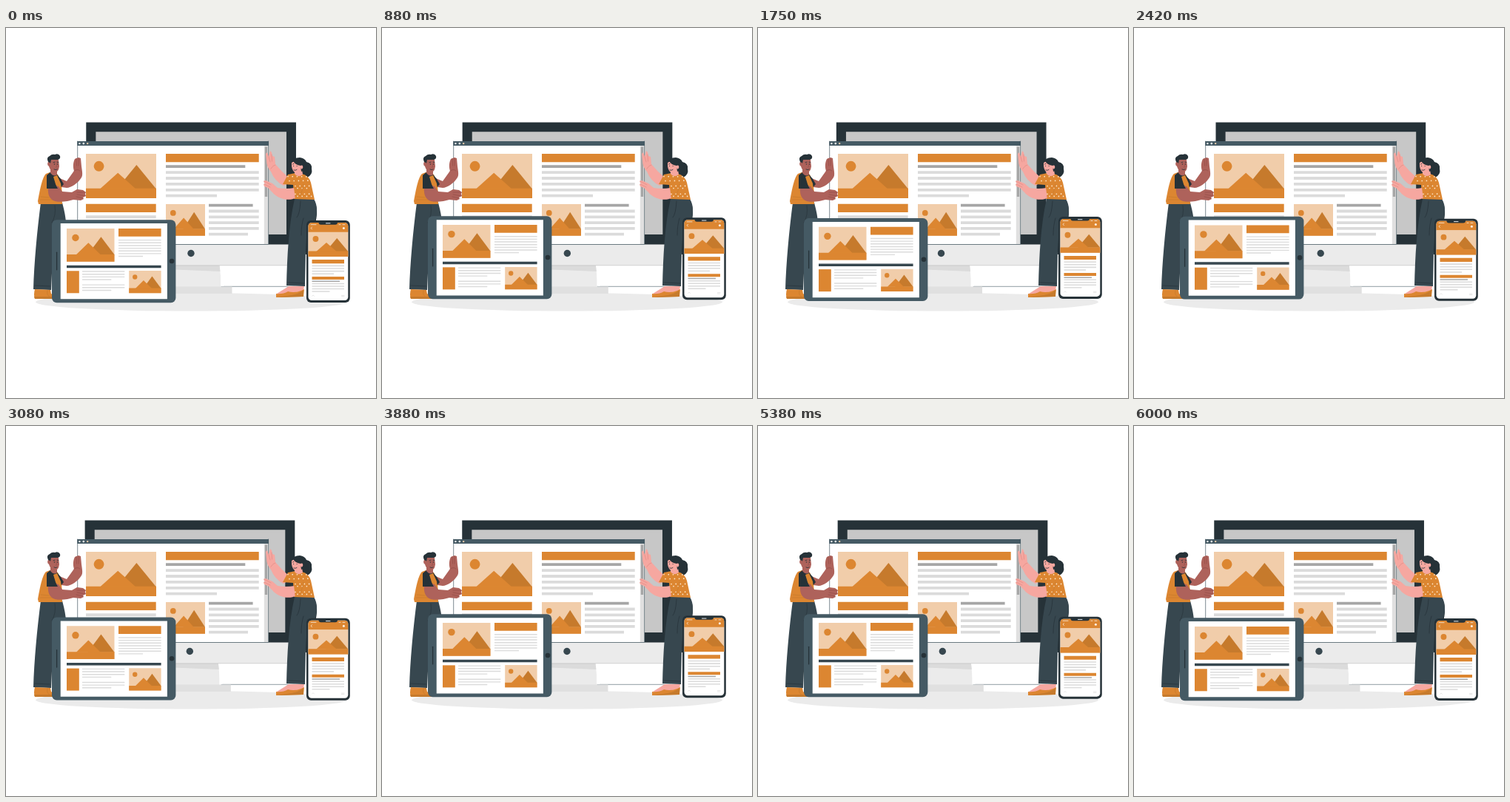
Animation, 500 px wide and 500 px high, one loop 6040 ms. Source, as an HTML page with a canvas:

```html
<!DOCTYPE html>
<html lang="en">
<head>
<meta charset="utf-8">
<title>Responsive layouts</title>
<style>
html, body { margin: 0; width: 100%; height: 100%; overflow: hidden; background: #fff; }
canvas { display: block; width: 500px; height: 500px; }
</style>
</head>
<body>
<canvas id="stage"></canvas>
<script>
const canvas = document.getElementById('stage');
const ctx = canvas.getContext('2d');
const dpr = window.devicePixelRatio || 1;
canvas.width = canvas.height = 500 * dpr;

const LOOP = 6040, LEAD = 25, REACH = 6.5;
const ORANGE = '#dc8631', BROWN = '#c67a2c', PEACH = '#f1cdaa';
const INK = '#263238', SLATE = '#455a64', PANTS = '#37474f';
const PALE = '#ebebeb', GREY = '#dbdbdb', MID = '#a6a6a6';
const SKIN = '#ae625b', SKIN_DARK = '#8d4844', PINK = '#f6a7a0';

function box(color, x1, y1, x2, y2, r = 0) {
  ctx.fillStyle = color;
  ctx.beginPath();
  ctx.roundRect(x1, y1, x2 - x1, y2 - y1, r);
  ctx.fill();
}
function disc(color, x, y, r, ry = r) {
  ctx.fillStyle = color;
  ctx.beginPath();
  ctx.ellipse(x, y, r, ry, 0, 0, Math.PI * 2);
  ctx.fill();
}
function shape(color, d) {
  ctx.fillStyle = color;
  ctx.fill(new Path2D(d));
}
function stroke(color, width, d) {
  ctx.strokeStyle = color;
  ctx.lineWidth = width;
  ctx.lineCap = ctx.lineJoin = 'round';
  ctx.stroke(new Path2D(d));
}
// Evenly spaced text lines; the last one is shorter.
function lines(x1, x2, last, y, step, count, h, color = GREY) {
  for (let i = 0; i < count; i++) {
    box(color, x1, y + i * step, i === count - 1 ? last : x2, y + i * step + h);
  }
}
function picture(x1, y1, x2, y2) {
  const w = x2 - x1, h = y2 - y1;
  const px = k => x1 + k * w, py = k => y1 + k * h;
  const peak = (color, l, m, r, top) =>
    shape(color, `M${px(l)} ${py(.79)}L${px(m)} ${py(top)}L${px(r)} ${py(.79)}Z`);
  box(PEACH, x1, y1, x2, y2);
  disc(ORANGE, px(.185), py(.28), w * .073);
  peak(BROWN, .44, .72, 1, .25);
  peak(ORANGE, .2, .455, .71, .43);
  box(ORANGE, x1, py(.78), x2, y2);
}
function moved(dx, dy, draw) {
  ctx.save();
  ctx.translate(dx, dy);
  draw();
  ctx.restore();
}

function monitor() {
  box(PALE, 210, 321, 290, 350);
  shape('#fff', 'M288.5 321H294V349H291.5Z');
  shape(GREY, 'M210 320H288.5L289.5 329L229 326.5H210Z');
  box('#e0e0e0', 195, 349.5, 305.5, 359);
  box(INK, 108.3, 127.6, 392, 293);
  box('#c7c7c7', 121.4, 140.2, 379, 279);
  box(PALE, 108.3, 292.5, 392, 321, [0, 0, 5, 5]);
  stroke(MID, .4, 'M110 320.8H389');
  disc(PANTS, 250, 304.5, 4.7);
}

function browser() {
  box('#fff', 96.5, 153, 354.8, 292.6);
  box('#e0e0e0', 348.8, 159, 354.4, 292);
  box(MID, 349.8, 160.5, 353.2, 228);
  stroke(SLATE, .7, 'M96.7 153V292.5H354.6V153');
  box(SLATE, 96.3, 153, 355, 159);
  disc('#fff', 99.4, 156.1, 1.2);
  disc('#fff', 104.8, 156.1, 1.3);
  disc(PEACH, 110.2, 156.1, 1.2);
  picture(108, 170, 203, 230);
  box(ORANGE, 108, 237.7, 202.7, 249);
  box(GREY, 108, 253.2, 202.7, 257.2);
  box(ORANGE, 216, 170, 341.7, 181.3);
  box(MID, 216, 185.2, 323.3, 189);
  lines(216, 341.7, 285, 193.2, 7.9, 5, 3.8);
  picture(216, 238, 269, 280.8);
  box(MID, 274, 237.8, 333.6, 241.5);
  lines(274, 341.7, 327, 245.6, 7.8, 5, 3.8);
}

function man() {
  // Raised far arm
  shape(SKIN, 'M70 202L82 207L92 193C90 187 91 181 93 177L95 176L98 175L101 176L102 187C103 194 104 199 102 202C98 209 88 216 82 216L68 214Z');
  stroke(SKIN_DARK, .6, 'M95 177L95.5 186M98 176.5L98 186M92 193Q97 190 100 193');
  shape(PANTS, 'M47 236H76C78 244 80 251 81 262L64 286L61 354L37 353C38 318 42 274 47 236Z');
  stroke(INK, .6, 'M66 240Q68 253 62 263M39 348L60 349');
  shape(ORANGE, 'M39 353L60 354L61 359L68 364V366H39Q37 360 39 353Z');
  shape(BROWN, 'M38 363H66V366H39Z');
  stroke(BROWN, .7, 'M56 355Q54 361 60 364');
  shape(ORANGE, 'M54 197C50 201 47 211 43 234L44 238H76L75 209L70 198L62 194Z');
  stroke(BROWN, .7, 'M46 232H74M47 228L58 229');
  shape(INK, 'M55 199L61 194L69 198L74 204L78 211L72 218L55 217Z');
  shape(ORANGE, 'M64 201L69 199L74 210L76 225L70 221Z');
  shape(SKIN, 'M60 190L69 190L69 198Q65 202 60 196Z');
  shape(SKIN, 'M58 178Q64 174 71 178L72 187Q71 195 66 195Q60 194 58 187Q55 183 58 178Z');
  shape(INK, 'M57 181Q54 175 59 173Q62 170 66 171Q71 169 73 173Q74 177 70 178L61 178L60 183Z');
  disc(SKIN, 58, 184, 1.8, 2.4);
  stroke(INK, .8, 'M64 181.8L66 181.2M69 181.2L70.7 181.5M65 191Q67 192.3 69 191');
  disc(INK, 65.4, 184, .65);
  disc(INK, 69.6, 184, .65);
  stroke(SKIN_DARK, .5, 'M67.7 183L69 188H67');
  // Near arm reaching across
  shape(SKIN, 'M57 215C56 225 59 232 66 234C75 236 84 234 91 232L101 233L105 231L104 229L108 227L107 224L108 222L104 219L96 218L89 222L76 221L71 214Q62 210 57 215Z');
  stroke(SKIN_DARK, .6, 'M96 222L107 222M96 225L107 227M95 228L104 230');
  shape(INK, 'M55 201Q64 205 70 217L57 217Z');
}

function woman() {
  // Raised far arm
  shape(PINK, 'M380 210L375 213Q363 207 358 194Q352 188 352 179L351 170L353 168L355 174L357 166L359 168L360 173L363 174L364 184Q373 195 383 203Z');
  stroke('#d77f79', .5, 'M355 174L357 181M359 171L359.5 180M358 190Q361 185 364 185');
  shape(INK, 'M386 182Q388 175 397 175Q404 176 406 181Q414 183 413 190Q415 198 407 202Q400 202 397 198L388 188Z');
  // Legs
  shape(INK, 'M398 236L417 234C421 243 421 252 418 264L413 306H405L397 275Z');
  shape(PANTS, 'M390 231H416C422 240 421 256 415 265L407 269L405 300L404 349L379 348C380 309 382 265 390 231Z');
  stroke(INK, .7, 'M398 234Q397 252 393 256M402 257Q399 266 399 280M381 344L403 345');
  shape(PINK, 'M382 349H403L402 355L371 361L366 359Z');
  shape(ORANGE, 'M365 359Q374 360 381 356Q392 359 403 353L402 363L365 364Z');
  shape(BROWN, 'M386 361Q397 359 402 354V363L365 364Z');
  // Blouse
  shape(ORANGE, 'M381 198L391 196L400 197Q409 199 412 209L417 232L389 231L388 212L374 211Z');
  shape(PINK, 'M390 191H400L401 198Q394 203 390 197Z');
  shape(PINK, 'M386 182Q391 178 399 181L400 190Q398 196 392 196Q387 194 386 187Z');
  shape(INK, 'M386 182Q390 175 398 177Q404 180 402 193L399 194L398 186Q391 185 388 180Z');
  disc(PINK, 399.5, 188, 1.8, 2.4);
  stroke(INK, .8, 'M387.5 184L389 183.5M392 183.5L394.5 184M389 192Q391 193 393 191.5');
  disc(INK, 388.6, 186.5, .6);
  disc(INK, 393.1, 186.5, .6);
  // Near arm
  shape(PINK, 'M390 216L392 229C383 235 367 231 360 222L354 216L349 214L348 211L350 211L348 207L351 206L360 210L367 216Q378 218 390 216Z');
  stroke('#d77f79', .5, 'M349 207L358 212M349 211L357 215M391 218Q393 224 390 229');
  shape(ORANGE, 'M388 208L402 208L400 230L391 231Z');
  ctx.fillStyle = '#fff';
  for (let row = 0; row < 6; row++) {
    const y = 201.5 + row * 5.4;
    const left = row < 2 ? 381 - row : 391;
    const right = 408 + row * 1.4;
    for (let x = left + row % 2 * 3; x < right; x += 6.2) disc('#ffe9ce', x, y + Math.sin(x) * 1.2, .85);
  }
  stroke(BROWN, .6, 'M389 211Q386 207 383 209M402 211Q401 220 397 227');
}

function tablet() {
  box(SLATE, 62, 259.5, 229.4, 371.4, 6.5);
  box('#fff', 73.7, 264.3, 217.9, 366.6);
  disc(INK, 224, 315.2, 3.3);
  stroke(INK, 1.3, 'M68.6 303.5V327');
  picture(82, 271.2, 146.5, 316);
  box(ORANGE, 152, 271.2, 209.6, 282);
  lines(152, 209.6, 185, 286.2, 3.65, 7, 1.4);
  box(PANTS, 82, 321, 209.6, 324.5);
  box(ORANGE, 82, 328.5, 98.8, 358.5);
  lines(103, 160.3, 142.3, 328.6, 3.65, 4, 1.4);
  lines(103, 160.3, 142.3, 346.7, 3.65, 3, 1.4);
  picture(166.2, 328.2, 209.6, 358.5);
}

function phone() {
  box(INK, 406, 260.2, 464.8, 371.2, 6);
  box('#fff', 408.5, 263.2, 462.3, 368.2, 4.5);
  box(ORANGE, 408.5, 263.2, 462.3, 276, [4.5, 4.5, 0, 0]);
  box(INK, 422.5, 261, 448, 265.8, [0, 0, 3, 3]);
  stroke('#fff', .9, 'M432.5 264H438');
  stroke('#fff', .7, 'M413.4 269.2L412.2 270.6L413.4 272M412 265.8H419M450 265.8H452M455 265.8H458');
  disc('#fff3e5', 456.4, 270.7, 1.5);
  picture(408.5, 275.8, 462.3, 309);
  box(ORANGE, 413.5, 313.2, 457, 318.4);
  lines(413.5, 457, 443, 320.7, 3.6, 4, 1.6);
  box(ORANGE, 413.5, 336.2, 457, 340.2);
  box(MID, 413.5, 341.7, 451, 343.2);
  lines(413.5, 457, 437.5, 344.9, 3.5, 4, 1.5);
  stroke(GREY, .7, 'M413.5 362.5L415 361L416.5 362.5M453.5 361.5H457M453.5 363H457');
}

// Linear lift and return, 0 at both ends.
function lift(t, period) {
  const p = t % period / period;
  return -REACH * (1 - Math.abs(2 * p - 1));
}
// Sideways shake with a stop at every tenth of the cycle.
const STOPS = [0, -1, 2, -4, 4, -4, 4, -4, 2, -1, 0];
function shake(t) {
  const p = t % 6000 / 600, i = Math.floor(p);
  return (STOPS[i] + (STOPS[i + 1] - STOPS[i]) * (p - i)) * .65;
}

function render(now) {
  const t = now % LOOP + LEAD;
  ctx.setTransform(dpr, 0, 0, dpr, 0, 0);
  box('#fff', 0, 0, 500, 500);
  disc(PALE, 250, 370.3, 210, 12.3);
  stroke(SLATE, .6, 'M291 349.3H390');
  moved(shake(t), 0, monitor);
  browser();
  man();
  woman();
  moved(0, lift(t, 1500), tablet);
  moved(0, lift(t, 3000), phone);
}

const start = performance.now();
function tick() {
  render(performance.now() - start);
  requestAnimationFrame(tick);
}
tick();
</script>
</body>
</html>
```
